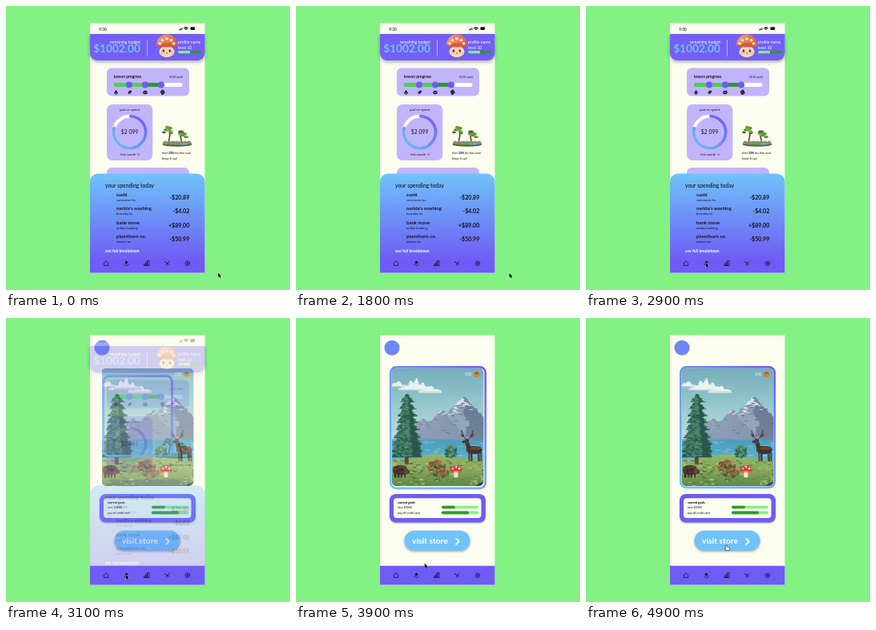
An HTML page with a canvas that plays this animation: 355x355 px, repeating every 5 s.

```html
<!DOCTYPE html>
<html lang="en">
<head>
<meta charset="utf-8">
<title>Budget app</title>
<style>
html, body { margin: 0; width: 100%; height: 100%; overflow: hidden; background: #83f183; }
canvas { display: block; width: 355px; height: 355px; }
</style>
</head>
<body>
<canvas id="stage"></canvas>
<script>
const SIZE = 355, LOOP = 5000, STEP = 100, TAU = Math.PI * 2;
const dpr = Math.max(1, window.devicePixelRatio || 1);
const C = {
  green: '#83f183', deep: '#2b9a2b', cream: '#fbfdee', purple: '#6f5bf5',
  lilac: '#c2b4fb', blue: '#6fc3fa', ink: '#15131f', white: '#ffffff'
};

function prepare(canvas) {
  canvas.width = canvas.height = Math.round(SIZE * dpr);
  const g = canvas.getContext('2d');
  g.scale(canvas.width / SIZE, canvas.width / SIZE);
  g.lineCap = g.lineJoin = 'round';
  return g;
}

function box(g, x, y, w, h, r, fill) {
  g.beginPath();
  g.roundRect(x, y, w, h, r);
  g.fillStyle = fill;
  g.fill();
}
function disc(g, x, y, rx, fill, ry = rx, turn = 0) {
  g.beginPath();
  g.ellipse(x, y, rx, ry, turn, 0, TAU);
  g.fillStyle = fill;
  g.fill();
}
function dome(g, x, y, rx, ry, fill) {
  g.beginPath();
  g.ellipse(x, y, rx, ry, 0, Math.PI, 0);
  g.fillStyle = fill;
  g.fill();
}
function arc(g, x, y, r, from, to, color, width) {
  g.beginPath();
  g.arc(x, y, r, from * Math.PI, to * Math.PI);
  g.strokeStyle = color;
  g.lineWidth = width;
  g.stroke();
}
function line(g, color, width, ...pts) {
  g.beginPath();
  for (let i = 0; i < pts.length; i += 2) g.lineTo(pts[i], pts[i + 1]);
  g.strokeStyle = color;
  g.lineWidth = width;
  g.stroke();
}
// Returns the width, so that runs of different weight can follow each other.
function text(g, s, x, y, size, color = C.ink, weight = 400, align = 'left') {
  g.font = `${weight} ${size}px Lato, sans-serif`;
  g.textAlign = align;
  g.fillStyle = color;
  g.fillText(s, x, y);
  return g.measureText(s).width;
}
function ramp(g, x0, y0, x1, y1, ...colors) {
  const grad = g.createLinearGradient(x0, y0, x1, y1);
  colors.forEach((c, i) => grad.addColorStop(i / (colors.length - 1), c));
  return grad;
}
function shadowed(g, blur, dy, draw) {
  g.save();
  g.shadowColor = 'rgba(40,40,90,.4)';
  g.shadowBlur = blur * dpr;
  g.shadowOffsetY = dy * dpr;
  draw();
  g.restore();
}
function random(seed) {
  return () => (seed = (seed * 16807) % 2147483647) / 2147483647;
}
const pick = (list, rnd) => list[Math.floor(rnd() * list.length)];

// ---- shared parts

function phone(g) {
  box(g, 105, 21.5, 143.5, 312, 0, C.cream);
}

function leafIcon(g, x, y) {
  disc(g, x + .3, y - .3, 2.7, C.ink, 1.6, -.7);
  line(g, C.lilac, .5, x - 1, y + 1, x + 1, y - 1);
}

function navIcons(g) {
  const y = 321.7, w = .75, slot = i => 125 + i * 25.5;
  const houseX = slot(0), r = 2.6;
  line(g, C.ink, w, houseX - r, y, houseX, y - 3, houseX + r, y, houseX + r, y + r, houseX - r, y + r, houseX - r, y);
  disc(g, slot(1), y - 1.2, 1.7, C.ink);
  arc(g, slot(1), y, 2.8, .1, .9, C.ink, w);
  for (let i = 0; i < 3; i++) {
    const h = 1.8 + i * 2.1;
    g.lineWidth = w;
    g.strokeRect(slot(2) - 3 + i * 2, y + 2.8 - h, 2, h);
  }
  line(g, C.ink, w, slot(3) - 1, y + 3, slot(3), y, slot(3) + 3, y - 2.6);
  line(g, C.ink, 1, slot(3) - 2.8, y - 1.8, slot(3), y, slot(3) + 1.8, y + 1);
  for (const r of [2.8, 1.1]) arc(g, slot(4), y, r, 0, 2, C.ink, w);
}

function progress(g, x, y, w, h, done) {
  box(g, x, y, w, h, h / 2, C.green);
  box(g, x, y, done, h, h / 2, C.deep);
}

// ---- home screen

function mascot(g) {
  const x = 201;
  disc(g, x, 57, 9.6, '#f7d5b4', 7.2);
  dome(g, x, 49, 13, 13.6, ramp(g, x - 10, 36, x + 10, 52, '#f2a06c', '#d9593d'));
  disc(g, x, 49, 13, '#d9593d', 2.4);
  for (let i = 0; i < 5; i++) {
    const a = Math.PI * (1.08 + i * .21);
    disc(g, x + 9 * Math.cos(a), 49 + 8 * Math.sin(a), 2, '#fbe0c4', 1.7);
  }
  for (const s of [-1, 1]) {
    disc(g, x + s * 4, 56, 1.4, '#3a2430', 1.7);
    disc(g, x + s * 4 + .4, 55.4, .5, C.white);
    disc(g, x + s * 6.4, 59, 1.3, '#f3a08f', .8);
  }
  disc(g, x, 59, .9, '#9c3c3a', .7);
}

function island(g) {
  const rnd = random(9), x0 = 214;
  disc(g, x0, 173, 18.5, '#655a4e', 2.8);
  disc(g, x0, 171.4, 18, '#6aa43f', 2.2);
  for (const [x, top, lean] of [[203, 151, 2], [220, 156, -2]]) {
    line(g, '#6b4428', 1.6, x, 171, x + lean, (top + 171) / 2, x, top);
    for (let i = 0; i < 14; i++) {
      const d = rnd();
      disc(g, x + (rnd() - .5) * (5 + 9 * d), top + 9 * d, 2.4, pick(['#3d6c32', '#5c8d3b', '#7cac47'], rnd), 1.3);
    }
  }
  for (let i = 0; i < 7; i++)
    disc(g, x0 - 15 + i * 5, 170, 1.6 + rnd(), pick(['#4b7c36', '#8a8f86'], rnd), 1.6);
  disc(g, x0 + 8, 172.4, 5, '#70b8cf', .9);
}

function header(g) {
  shadowed(g, 4, 2, () => box(g, 105, 35, 143.5, 33, [0, 0, 9, 9], '#735ff5'));
  text(g, 'remaining budget', 168, 47.2, 5, C.white, 400, 'right');
  text(g, '$1002.00', 168, 58.2, 13.7, C.blue, 700, 'right');
  line(g, '#d9d6ff', .7, 176.5, 42.5, 176.5, 62.5);
  mascot(g);
  text(g, 'profile name', 215, 46.8, 5.2, C.white);
  text(g, 'level 10', 215, 54, 5, C.white);
  box(g, 215, 56, 30, 3.2, 1.6, C.deep);
  box(g, 215, 56, 15, 3.2, [1.6, 0, 0, 1.6], C.green);
}

function lesson(g) {
  box(g, 126, 77.5, 103, 35, 6, C.lilac);
  text(g, 'lesson progress', 135, 90, 5, C.ink, 700);
  text(g, '60.10 saved', 221, 89.8, 3.2, C.ink, 400, 'right');
  box(g, 135, 96, 85.5, 5, 2.5, C.white);
  box(g, 135, 96, 60, 5, 2.5, C.deep);
  box(g, 135, 96, 38, 5, [2.5, 0, 0, 2.5], '#43d84a');
  for (let i = 0; i < 4; i++) {
    const x = 134 + i * 20;
    if (i) disc(g, x, 98.5, 4, C.purple);
  }
  disc(g, 137.5, 108.6, 2.1, C.ink);
  line(g, C.ink, 1.4, 137.5, 105.8, 137.5, 108);
  disc(g, 137.5, 109, .8, C.lilac);
  leafIcon(g, 154.5, 108);
  disc(g, 174, 108, 2.7, C.ink, 2.2);
  arc(g, 174, 107, 1.5, .1, .9, C.lilac, .7);
  leafIcon(g, 195, 107);
  leafIcon(g, 196, 109.2);
}

function spent(g) {
  const x = 154.6, y = 157.7, r = 20;
  box(g, 126, 123, 57.3, 70, 7, C.lilac);
  text(g, "you've spent", x, 131.3, 4.6, C.ink, 400, 'center');
  arc(g, x, y, r, 0, 2, C.white, 4);
  arc(g, x, y, r, -.48, 1.08, ramp(g, x + r, y - r, x - r, y + r, C.purple, C.blue), 4);
  text(g, '$2 099', x, 160.1, 6.8, C.ink, 400, 'center');
  text(g, 'this month', 143, 187, 4.1);
  line(g, C.ink, .6, 164.2, 185, 165.6, 186.4, 167, 185);
  island(g);
  let end = 195;
  for (const [s, weight] of [["that's ", 400], ['23%', 900], [' less than usual', 400]])
    end += text(g, s, end, 184.7, 3.2, C.ink, weight);
  text(g, 'keep it up!', 195, 192.4, 4.1);
  box(g, 126, 202, 103, 30, 6, C.lilac);
}

function spending(g) {
  box(g, 105, 209.5, 143.5, 124, [10, 10, 0, 0], ramp(g, 0, 210, 0, 318, C.blue, '#6d90f7', C.purple));
  text(g, 'your spending today', 124, 227, 6.8, C.ink, 500);
  [
    ['sushi', 'vancouver bc', '-$20.89'],
    ["nerida's washing", 'burnaby bc', '-$4.02'],
    ['bank move', 'online banking', '+$89.00'],
    ['plumthorn co.', 'ottawa on', '-$50.99']
  ].forEach(([name, place, sum], i) => {
    const y = 238 + i * 17.4;
    text(g, name, 138, y, 6, C.ink, 700);
    text(g, place, 138, y + 5.8, 4.2);
    text(g, sum, 229.3, y + 4, 7.1, C.ink, 700, 'right');
  });
  text(g, 'see full breakdown', 124, 308, 5.1, C.white, 700);
}

function statusBar(g) {
  text(g, '9:30', 116.3, 30.5, 4.8, C.ink, 500);
  for (let i = 0; i < 4; i++) box(g, 216 + i * 1.2, 29.2 - i * .7, .8, 1 + i * .7, 0, C.ink);
  for (let r = 1; r < 4; r++) arc(g, 225, 30, r * 1.2, 1.25, 1.75, C.ink, 1);
  box(g, 230.5, 26.3, 5.6, 3.6, .9, C.ink);
}

function home(g) {
  [phone, statusBar, header, lesson, spent, spending, navIcons].forEach(part => part(g));
}

// ---- forest screen, built from rows of square cells

const CELL = 1.25;
const VIEW = { x: 119.5, y: 62.5, w: 115, h: 147.5 };

function rows(top, base, draw) {
  for (let y = top; y < base; y += CELL) draw(y, y - top);
}

function peak(g, rnd, x, top, slope, snow, light, dark) {
  rows(top, 153, (y, d) => {
    const w = d * slope + rnd() * 2, ridge = x + 3 * Math.sin(d / 4) + d * .15;
    box(g, x - w, y, w * 2, CELL + .2, 0, light);
    box(g, ridge, y, Math.max(0, x + w - ridge), CELL + .2, 0, dark);
    if (d < snow) box(g, x - w, y, w * 1.7, CELL + .2, 0, '#eef2f3');
    else if (d < snow * 2.2) box(g, x + (rnd() - .6) * w * 1.5, y, 4, CELL * 2, 0, '#dfe7ec');
    box(g, x + (rnd() - .5) * w * 2, y, 4, CELL, 0, dark);
  });
}

function cloud(g, x, y, w, h) {
  for (let i = -w; i <= w; i += CELL) {
    const rise = h * (1 - Math.abs(i) / w) * (.75 + .25 * Math.sin(i * .8));
    box(g, x + i, y - rise, CELL + .2, rise + 2, 0, '#eef3f1');
    box(g, x + i, y + 1, CELL + .2, 1.5, 0, '#b9d3da');
  }
}

function pine(g, rnd) {
  const x = 138, greens = ['#356b58', '#417d62', '#2a574c', '#4c8766'];
  box(g, x - 2.5, 165, 5, 17, 0, '#5d4438');
  rows(95, 173, (y, d) => {
    const w = 1 + d * .19 + (d % 9) / 9 * 5;
    for (let i = -w; i < w; i += 3) box(g, x + i, y, 3.2, CELL + .2, 0, pick(greens, rnd));
    box(g, x + w * .4, y, w * .6, CELL + .2, 0, '#2a574c');
  });
}

function bush(g, rnd, x, y, w, h, colors) {
  for (let i = 0; i < w * h; i++) {
    const a = rnd() * TAU, r = Math.sqrt(rnd());
    box(g, x + Math.cos(a) * r * w, y + Math.sin(a) * r * h, 2.2, 2.2, 0, pick(colors, rnd));
  }
}

function deer(g) {
  const fur = '#46302b', x = 223, y = 165;
  disc(g, x, y, 10, fur, 5);
  line(g, fur, 5, x - 6, y, x - 9, y - 9);
  disc(g, x - 11, y - 11, 4.2, fur, 2.2, -.3);
  for (const dx of [-7, -4, 5, 8]) line(g, fur, 1.8, x + dx, y + 2, x + dx + .5, y + 14);
  for (const s of [-1, 1]) {
    const ax = x - 9 + s * 5;
    line(g, fur, 1.2, x - 9, y - 12, ax, y - 17, ax + s * 2, y - 25);
    line(g, fur, 1.2, ax, y - 17, ax + s * 4, y - 20);
  }
  disc(g, x + 1, y - 2, 6, '#69483d', 1.8);
}

function boar(g, rnd) {
  const x = 130, y = 190;
  disc(g, x, y, 9.5, '#4d3530', 6.5);
  disc(g, x + 8, y + 2, 4.5, '#5f443a', 3.2, .5);
  for (let i = 0; i < 4; i++) line(g, '#38272a', 2, x - 6 + i * 4, y + 4, x - 6 + i * 4, y + 9.5);
  bush(g, rnd, x - 1, y - 2, 8, 4, ['#6b4a3d', '#3a292b']);
}

function toadstool(g) {
  box(g, 197.5, 190, 5, 9, 0, '#f3e4cc');
  dome(g, 200, 192, 7.5, 8, '#d9382e');
  for (let i = -1; i < 2; i++) disc(g, 200 + i * 4, 188 - (i ? 0 : 2), 1.2, C.white);
}

function meadow(g, rnd) {
  for (let x = 118; x < 240; x += CELL) {
    const y = 173 + 3 * Math.sin(x / 16) + rnd() * 1.5;
    box(g, x, y, CELL + .2, 214 - y, 0, ramp(g, 0, 172, 0, 212, '#94b563', '#7ea053', '#55803f'));
  }
  for (let i = 0; i < 170; i++)
    box(g, 118 + rnd() * 120, 177 + rnd() * 35, 2 + rnd() * 3, CELL, 0, pick(['#5b8444', '#b2c777', '#446d3a'], rnd));
  disc(g, 236, 212, 12, '#43424c', 7);
}

function scenery(g) {
  const rnd = random(41);
  box(g, 118, 60, 122, 100, 0, ramp(g, 0, 62, 0, 150, '#75adb9', '#93c6cd', '#c0dedd'));
  cloud(g, 148, 88, 20, 14);
  cloud(g, 167, 91, 14, 7);
  cloud(g, 126, 84, 9, 6);
  peak(g, rnd, 157, 126, 1.3, 0, '#93a6bb', '#8095ad');
  peak(g, rnd, 181, 116, 1, 2, '#8d9db7', '#74859f');
  peak(g, rnd, 209, 99, 1.05, 10, '#8b9bb5', '#66768f');
  box(g, 118, 152, 122, 30, 0, ramp(g, 0, 152, 0, 180, '#4a9dbd', '#5fb3cb'));
  for (let i = 0; i < 24; i++) box(g, 145 + rnd() * 90, 154 + rnd() * 18, 6, CELL, 0, '#7fc4d6');
  const leaves = ['#3f6f45', '#5b8c50', '#2f5a40'], berries = ['#c2402f', '#d9653a', '#8d3a30'];
  meadow(g, rnd);
  pine(g, rnd);
  bush(g, rnd, 192, 166, 8, 7, leaves);
  deer(g);
  boar(g, rnd);
  bush(g, rnd, 175, 186, 11, 10, [...leaves, ...berries]);
  bush(g, rnd, 184, 194, 6, 5, [...leaves, ...berries]);
  toadstool(g);
}

// The scene is drawn small, then enlarged without smoothing.
function forest(g) {
  const { x, y, w, h } = VIEW, cv = document.createElement('canvas');
  cv.width = w / CELL;
  cv.height = h / CELL;
  const p = cv.getContext('2d');
  p.scale(1 / CELL, 1 / CELL);
  p.translate(-x, -y);
  scenery(p);
  g.save();
  g.beginPath();
  g.roundRect(x, y, w, h, 6);
  g.clip();
  g.imageSmoothingEnabled = false;
  g.drawImage(cv, x, y, w, h);
  g.restore();
  text(g, '100', 219.5, 71.8, 5, C.white, 400, 'right');
  disc(g, 225.8, 70.3, 3.6, '#c9823c');
  dome(g, 225.8, 70, 2.8, 2.2, '#97602f');
}

function goals(g) {
  shadowed(g, 2, 1, () => box(g, 117, 220, 120, 35.5, 8, C.purple));
  box(g, 122, 225.3, 109.5, 24.8, 4, C.cream);
  text(g, 'current goals', 127, 231.9, 3.7, C.ink, 900);
  [['save $3000', 17], ['pay off credit card', 34]].forEach(([s, done], i) => {
    const y = 238 + i * 6.9;
    text(g, s, 127, y, 3.5);
    progress(g, 182, y - 3.3, 46, 3.6, done);
  });
}

function garden(g) {
  phone(g);
  disc(g, 120, 37.2, 9.5, '#6f87f7');
  forest(g);
  goals(g);
  shadowed(g, 3, 1.5, () => box(g, 135.5, 265.8, 82, 24.8, 12.4, C.blue));
  text(g, 'visit store', 145, 282, 10.3, C.white, 700);
  line(g, C.white, 1.7, 200.2, 275.6, 203.8, 279.2, 200.2, 282.8);
  box(g, 105, 309.8, 143.5, 23.7, 0, C.purple);
  navIcons(g);
}

// ---- moving parts

const mix = (a, b, k) => a + (b - a) * k;
const span = (t, from, to) => Math.min(1, Math.max(0, (t - from) / (to - from)));
const smooth = k => k * k * (3 - 2 * k);
const easeOut = (k, power) => 1 - (1 - k) ** power;

// The border grows out of the middle of the home cards to surround the scene.
function border(g, k, extra) {
  const l = mix(126, 118.3, k), t = mix(87, 61.3, k);
  const r = mix(171, 235.8 + extra, k), b = mix(122, 211.8 + extra, k);
  g.beginPath();
  g.roundRect(l, t, r - l, b - t, 7);
  g.strokeStyle = ramp(g, l, b, r, t, C.blue, '#6f9df8', C.purple);
  g.lineWidth = 2.7;
  g.stroke();
}

function arrow(g, x, y) {
  g.beginPath();
  for (const [dx, dy] of [[0, 0], [0, 5.2], [3.8, 3.7]]) g.lineTo(x + dx, y + dy);
  g.closePath();
  g.strokeStyle = C.white;
  g.lineWidth = .6;
  g.stroke();
  g.fillStyle = '#000';
  g.fill();
  line(g, '#000', 1, x + 1.5, y + 3.5, x + 2.5, y + 5.7);
}

function hand(g, x, y) {
  for (const [grow, color] of [[.45, '#111'], [0, C.white]]) {
    const part = (dx, dy, w, h) =>
      box(g, x + dx - grow, y + dy - grow, w + grow * 2, h + grow * 2, .7, color);
    part(-1.2, -3, 1.1, 5);
    part(-1.2, -.7, 3.8, 3.6);
    part(-2.5, .2, 2, 1.3);
  }
}

function cursor(g, t) {
  const nudge = smooth(span(t, 1200, 1500));
  const toNav = smooth(span(t, 1800, 2150));
  const toStore = smooth(span(t, 3700, 4150));
  const x = mix(mix(265.2 + 1.5 * nudge, 149.6, toNav), 176.3, toStore);
  const y = mix(mix(333.5 + .6 * nudge, 320.8, toNav), 287.3, toStore);
  (toStore > .9 ? hand : arrow)(g, x, y);
}

const stage = prepare(document.getElementById('stage'));
const [homeLayer, gardenLayer] = [home, garden].map(paint => {
  const g = prepare(document.createElement('canvas'));
  paint(g);
  return g.canvas;
});

function draw(g, t) {
  const k = span(t, 3000, 3300);
  box(g, 0, 0, SIZE, SIZE, 0, C.green);
  if (k < 1) g.drawImage(homeLayer, 0, 0, SIZE, SIZE);
  if (k > 0) {
    g.globalAlpha = easeOut(k, 3);
    g.drawImage(gardenLayer, 0, 0, SIZE, SIZE);
    border(g, easeOut(k, 2), t < 4000 ? 1 : 0);
    g.globalAlpha = 1;
  }
  cursor(g, t);
}

const start = performance.now();
function tick() {
  const t = (performance.now() - start) % LOOP;
  draw(stage, Math.floor(t / STEP) * STEP);
  requestAnimationFrame(tick);
}
tick();
</script>
</body>
</html>
```
